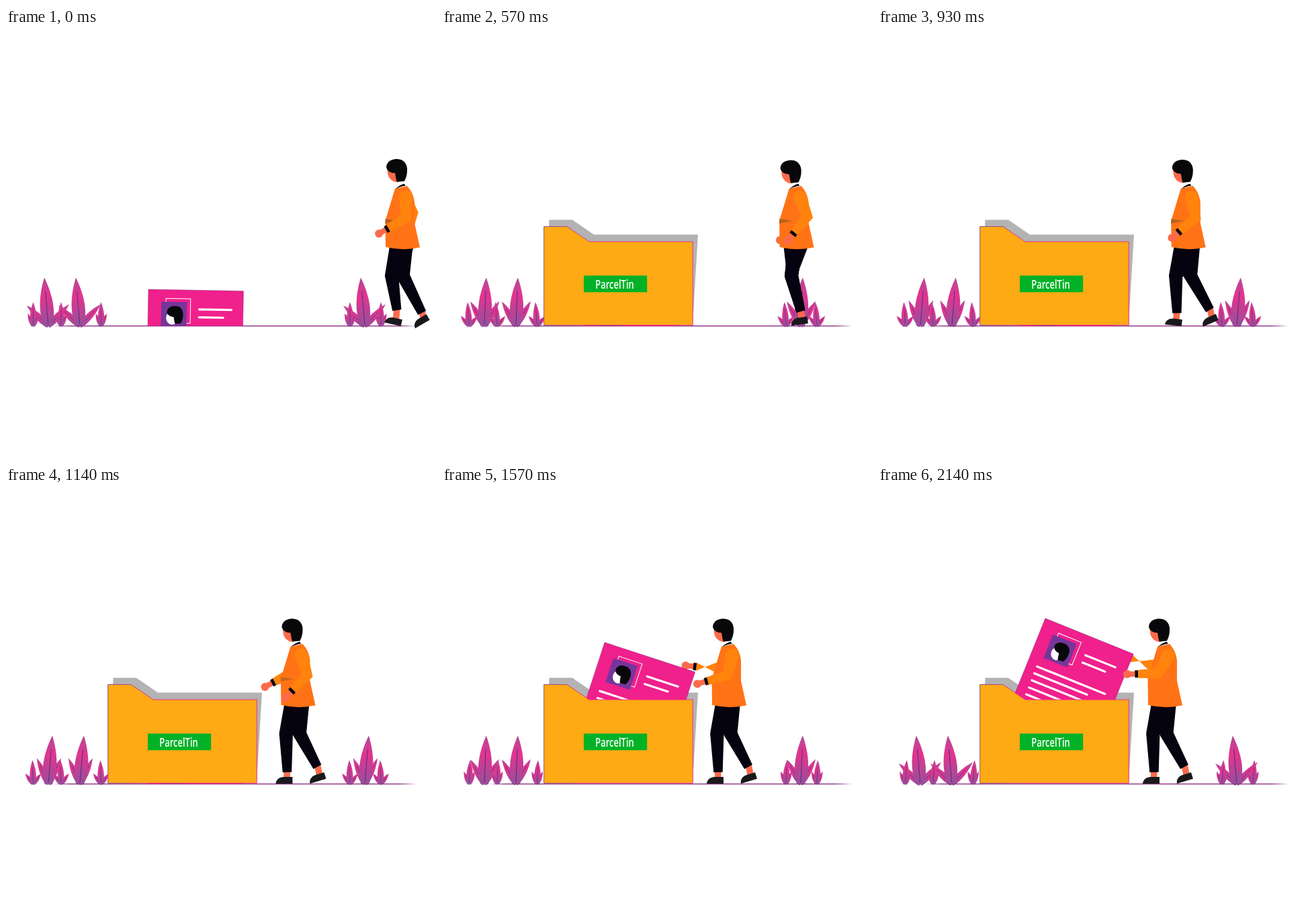
An HTML page for the animation above (2210 ms loop, 640 by 640 pixels).

```html
<!DOCTYPE html>
<html lang="en">
<head>
<meta charset="utf-8">
<title>Folder and walker</title>
<style>
  html, body { margin: 0; width: 100%; height: 100%; overflow: hidden; background: #fff; }
  svg { display: block; width: 100%; height: 100%; }
</style>
</head>
<body>
<svg viewBox="0 0 640 640">
  <defs>
    <linearGradient id="leaf" x1="0" y1="0" x2="0" y2="1">
      <stop offset="0" stop-color="#b14a98"/>
      <stop offset=".38" stop-color="#e2348f"/>
      <stop offset="1" stop-color="#95509b"/>
    </linearGradient>
    <linearGradient id="edge">
      <stop offset="0" stop-color="#7d4a88"/>
      <stop offset=".3" stop-color="#f0228c"/>
    </linearGradient>
    <clipPath id="aboveGround"><path d="M0 0H640V443.500H0z"/></clipPath>
    <path id="hair" d="M0 12C1 2 10 0 16 0C27 0 32 9 31 18C31 25 28 31 27 33L16 34C14 30 14 24 13 21C7 21 1 18 0 12z" fill="#08080a"/>
  </defs>
  <g id="plants"></g>
  <path d="M70 443.500L95 442.700H585L611 443.500L585 444.300H95z" fill="#8e3a86"/>
  <g clip-path="url(#aboveGround)">
    <path id="folderBack" d="M159.500 285.500H194L226 307.500H381L373 441H152z" fill="#b3b3b3"/>
  </g>
  <g id="farArm"></g>
  <g clip-path="url(#aboveGround)">
    <g id="card">
      <path d="M0 0H141.500V145H0z" fill="#f0208c" stroke="#8a2a7a" stroke-width=".5"/>
      <path d="M26.500 13H63V49.500H26.500z" fill="none" stroke="#fff"/>
      <path d="M19.500 18H57.500V55.500H19.500z" fill="#75369a"/>
      <ellipse cx="36" cy="42" rx="9" ry="10" fill="#fff"/>
      <use href="#hair" transform="translate(28 24) scale(.78)"/>
      <path d="M76 28.500H124M76 40.300H112M15.500 71H124.500M15.500 82H100M16 93H124M16 104.500H124M16 115.500H124"
            fill="none" stroke="#fff" stroke-width="3.200" stroke-linecap="round"/>
    </g>
    <g id="folderFront">
      <path d="M151.700 295.500H186L219 318H373.300V442.300H151.700z" fill="#fdaa14" stroke="url(#edge)" stroke-width=".9"/>
      <path d="M211 368.500H305.200V393.200H211z" fill="#02b226"/>
      <text transform="translate(257 388) scale(1 1.45)" text-anchor="middle" fill="#fff"
            font-family="'Open Sans', 'Noto Sans', sans-serif" font-size="13" font-weight="600">ParcelTin</text>
    </g>
  </g>
  <g id="walker"></g>
</svg>
<script>
const LOOP = 2210, FPS = 14, LAST = 30;
const STRIDE = 11;      // steps from one footfall to the next
const WALK_END = 15;    // the gait freezes here
const SKIN = '#fb6b4b', SLEEVE = '#ff830c', CLOTH = '#05030f';

const $ = id => document.getElementById(id);
const move = (id, transform) => $(id).setAttribute('transform', transform);
const clamp = p => Math.min(1, Math.max(0, p));
const smooth = p => (p = clamp(p)) * p * (3 - 2 * p);
const easeOut = (p, power) => 1 - (1 - clamp(p)) ** power;
const reachAt = step => easeOut((step - 14) / 16, 2);

// ---- plants ----
function leaf(x, tipX, tipY, w) {
  const len = Math.hypot(tipX, tipY), turn = Math.atan2(tipX, -tipY) * 180 / Math.PI;
  const a = w * .28, b = w * .74, c = w * .4, low = -len * .33, high = -len * .72;
  return `<g transform="translate(${x} 444) rotate(${turn})">
    <path d="M${-a} 0C${-b} ${low} ${-c} ${high} 0 ${-len}C${c} ${high} ${b} ${low} ${a} 0z" fill="url(#leaf)"/>
    <path d="M0 -3V${high}" stroke="#54307c" stroke-width="${w > 12 ? 1 : .7}"/></g>`;
}

function plants(step) {
  const fold = Math.sin(Math.PI * step / LAST);
  const open = Math.max(0, Math.sin(Math.PI * step / 22));
  const lean = -2.5 * Math.sin(2 * Math.PI * step / 37);
  const big = x =>
    leaf(x, -32 + 15 * fold, -31 - 8 * fold, 10) +
    leaf(x, 31 - 12 * fold, -33 - 6 * fold, 10) +
    leaf(x, -6 + 12 * fold, -72.5, 20);
  const small = x =>
    leaf(x, -8 - 5 * open, -19 + 4 * open, 6.5) +
    leaf(x, 8.5 + 4 * open, -19 + 4 * open, 6.5) +
    leaf(x, lean, -36, 9.5);
  return [63, 110, 534].map(big).join('') + [40.5, 82, 141.5, 512, 558].map(small).join('');
}

// ---- walker: coordinates are relative to the front of the hair ----
// Tapered limb through three joints; each joint is [x, y, half width].
function limb(joints, fill) {
  const heading = (p, q) => Math.atan2(q[1] - p[1], q[0] - p[0]);
  const first = heading(joints[0], joints[1]), second = heading(joints[1], joints[2]);
  const turns = [first, (first + second) / 2, second];
  const rail = side => joints.map(([x, y, half], n) =>
    [x - Math.sin(turns[n]) * half * side, y + Math.cos(turns[n]) * half * side]);
  return `<polygon points="${[...rail(1), ...rail(-1).reverse()].join(' ')}" fill="${fill}"/>`;
}

// side is 1 for the leg that starts in front, -1 for the other.
function leg(step, side) {
  const phase = Math.PI * (Math.min(step, WALK_END) - 2.5) / STRIDE;
  const s = 1.1 * side * Math.cos(phase);
  const lift = Math.max(0, -Math.sin(2 * phase) / 2);
  const ankle = [30.5 - 22.5 * s + 8 * lift, 422 + 4 * s - 13 * s * lift, 6.7];
  const shoe = [28 - 24.5 * s + 6 * lift, 436.3 + 1.7 * s - 4 * s * lift];
  const tilt = -8.5 + 8.5 * s + 35 * s * lift;
  return `<path d="M${ankle[0]} ${ankle[1] - 3}L${shoe[0] + 4} ${shoe[1] - 3}" stroke="${SKIN}" stroke-width="9.5"/>
    ${limb([[22 - 7.5 * s, 327, 11], [16.5 - 10.2 * s, 369, 10.2], ankle], CLOTH)}
    <path transform="translate(${shoe}) rotate(${tilt})" d="M-12.500 5C-12 -1 -7 -5 0 -5H12.500V5z" fill="#19191d"/>`;
}

// Angles are in degrees, forward from hanging straight down.
function arm(x, y, angle, bend) {
  const point = (from, degrees, length) => {
    const a = degrees * Math.PI / 180;
    return [from[0] - Math.sin(a) * length, from[1] + Math.cos(a) * length];
  };
  const shoulder = [x, y], fore = angle + bend;
  const elbow = point(shoulder, angle, 31), wrist = point(elbow, fore, 30);
  const hand = point(wrist, fore, 16);
  return `<path d="M${wrist}L${hand}" stroke="${SKIN}" stroke-width="8"/>
    <circle cx="${hand[0]}" cy="${hand[1]}" r="6" fill="${SKIN}"/>
    <circle cx="${x}" cy="${y}" r="10" fill="${SLEEVE}"/>
    ${limb([[...shoulder, 10], [...elbow, 8.7], [...wrist, 6]], SLEEVE)}
    <path d="M${wrist}L${point(wrist, fore, 4.5)}" stroke="${CLOTH}" stroke-width="11"/>`;
}

// Swinging blends into reaching for the card.
function arms(step) {
  const reach = reachAt(step);
  const swing = 18 * Math.cos(2 * Math.PI * Math.min(step, WALK_END) / STRIDE) - 18;
  const blend = (from, to) => from + (to - from) * reach;
  return {
    near: arm(29, 252, blend(swing, 29), 60),
    far: arm(25, 248, blend(-27 - 1.15 * swing, 50), blend(40, 62))
  };
}

function body(step, nearArm) {
  const bob = 1.5 - 1.5 * Math.cos(2 * Math.PI * Math.min(step, WALK_END) / STRIDE);
  return `${leg(step, -1)}${leg(step, 1)}
    <path d="M5 326H41L24 370H10z" fill="${CLOTH}"/>
    <path d="M13 239L-1.500 287L-1 326Q24 332 50 326.500L42 290V260Q41 246 31 235z" fill="#ff7316"/>
    <path d="M14 239.500Q20 233 27 232L28.500 235Q22 235 14 239.500z" fill="${CLOTH}"/>
    <path d="M-1.500 284L18 287L-1.500 291z" fill="#b5621e" opacity="${1 - reachAt(step)}"/>
    <g transform="translate(0 ${195 + bob})">
      <path d="M2 13C0 27 8 35 18 34.500L17 17z" fill="${SKIN}"/>
      <use href="#hair"/>
    </g>
    ${nearArm}`;
}

// ---- scene ----
function draw(step) {
  const place = `translate(${566 - 163 * smooth((step - .5) / 17.8)} 0)`;
  const below = 1 - easeOut((step - 16) / 14, 3);
  const { near, far } = arms(step);

  $('plants').innerHTML = plants(step);
  $('farArm').innerHTML = far;
  $('walker').innerHTML = body(step, near);
  move('farArm', place);
  move('walker', place);
  move('folderBack', `translate(0 ${160 - 160 * easeOut(step / 8, 1.65)})`);
  move('folderFront', `translate(0 ${150 - 150 * easeOut(step / 8, 1.77)})`);
  move('card', `translate(${249 - 37 * below} ${197 + 192 * below}) rotate(${22 - 21 * below})`);
}

const start = performance.now();
let shown = -1;
function tick() {
  const time = (performance.now() - start) % LOOP;
  const step = Math.floor((time + 5) * FPS / 1000);
  if (step !== shown) draw(shown = step);
  requestAnimationFrame(tick);
}
tick();
</script>
</body>
</html>
```
